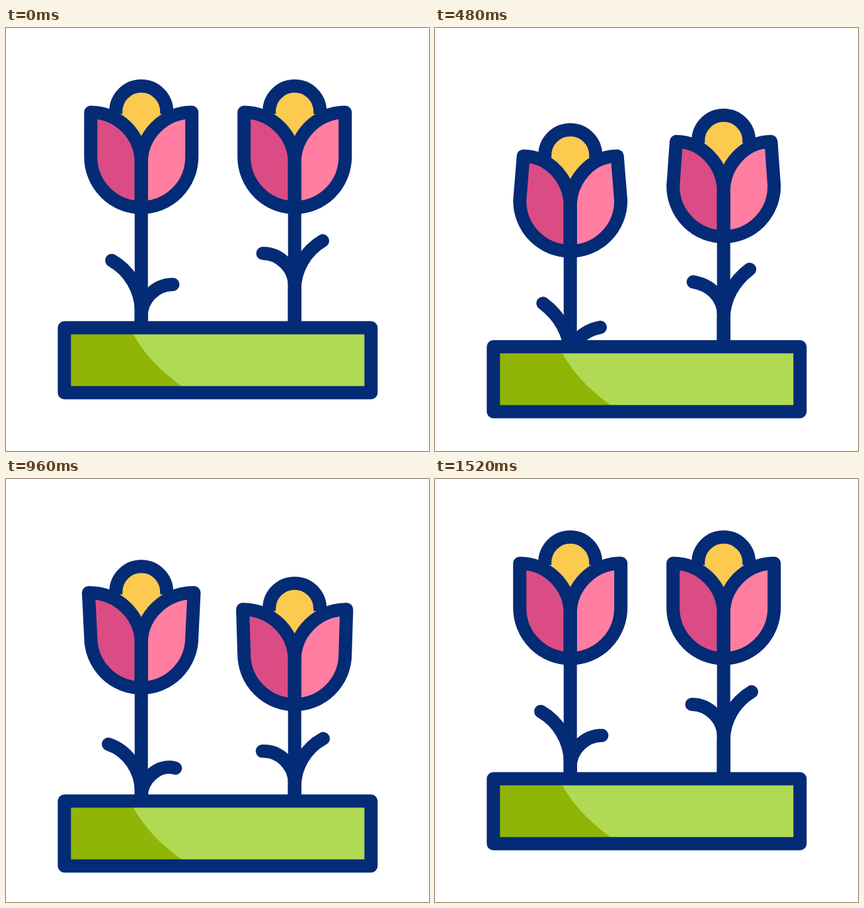
An HTML page for the animation above (1600 ms loop, 640x640 px).

```html
<!DOCTYPE html>
<html lang="en">
<head>
<meta charset="utf-8">
<title>Tulips</title>
<style>
  html, body { margin: 0; width: 100%; height: 100%; overflow: hidden; background: #fff; }
  svg { display: block; width: 100%; height: 100%; }
  .line { stroke: #042b75; stroke-width: 20; stroke-linecap: round; stroke-linejoin: round; }
</style>
</head>
<body>
<svg viewBox="0 0 640 640">
  <g id="flowers"></g>
  <g id="ground">
    <path d="M88.3 453.5H552.3V551.7H88.3Z" fill="#b0da54"/>
    <path d="M88.3 453.5H187.5C205 489 232 520 280 551.7H88.3Z" fill="#91b507"/>
    <path class="line" d="M88.3 453.5H552.3V551.7H88.3Z" fill="none"/>
  </g>
</svg>
<script>
const LOOP = 1600;
const NS = 'http://www.w3.org/2000/svg';
const ground = document.getElementById('ground');

function add(parent, tag, attrs) {
  const el = document.createElementNS(NS, tag);
  for (const name in attrs) el.setAttribute(name, attrs[name]);
  return parent.appendChild(el);
}

const smooth = s => s * s * (3 - 2 * s);

// Ease in and out, same as cubic-bezier(.5, 0, .5, 1)
function ease(s) {
  let lo = 0, hi = 1;
  for (let i = 0; i < 24; i++) {
    const u = (lo + hi) / 2;
    if (1.5 * u - 1.5 * u * u + u * u * u < s) lo = u; else hi = u;
  }
  return smooth((lo + hi) / 2);
}

// Value at time t along [time, value] keys
function track(keys, t, curve) {
  if (t <= keys[0][0]) return keys[0][1];
  for (let i = 1; i < keys.length; i++) {
    const [t0, v0] = keys[i - 1], [t1, v1] = keys[i];
    if (t < t1) return v0 + (v1 - v0) * curve((t - t0) / (t1 - t0));
  }
  return keys[keys.length - 1][1];
}

const groundKeys = [[10, 0], [760, 39], [1480, 0]];

// Leaves are given as offsets from the stem; long = slanted leaf, short = round leaf
const flowers = [
  {
    x: 204.7,
    sink: [[80, 0], [560, 39], [1208, 0]],
    tilt: [[80, 0], [320, 5.5], [620, 5.5], [900, -3.5], [1360, 0]],
    open: 1.5, side: -1,
    long: { x: 44.7, y: 351.7, root: 428 },
    short: { x: 47.8, y: 388, root: 436 }
  },
  {
    x: 436.7,
    sink: [[250, 0], [760, 38], [880, 38], [1340, 0]],
    tilt: [[280, 0], [600, 7], [700, 7], [1100, -5.6], [1520, 0]],
    open: 0.45, side: 1,
    long: { x: 42.3, y: 322, root: 396 },
    short: { x: 48.2, y: 341, root: 389.5 }
  }
];

function build(f) {
  const g = f.el = add(document.getElementById('flowers'), 'g', {});
  add(g, 'path', { d: 'M-38.5 138V126.3A38.5 38.5 0 0 1 38.5 126.3V138L0 180Z', fill: '#fdca50' });
  add(g, 'path', {
    d: 'M-38.5 130V126.3A38.5 38.5 0 0 1 38.5 126.3V130',
    class: 'line', fill: 'none', style: 'stroke-linecap:butt'
  });
  f.petals = ['#db4c85', '#ff7ea1'].map((fill, i) =>
    add(g, 'path', { fill, class: 'line', transform: `scale(${i ? -1 : 1} 1)` }));
  add(g, 'path', { d: 'M0 205V470', class: 'line' });
  f.leaves = [f.side, -f.side].map(dir =>
    add(g, 'path', { fill: 'none', class: 'line', transform: `scale(${dir} 1)` }));
}

function petal(k) {
  const tip = -76.5 + k;
  return `M${tip} 127.5L-76.5 195A76.5 76.5 0 0 0 0 271.5V204C0 161.8 ${-34.3 + k * 0.3} 127.5 ${tip} 127.5Z`;
}

function longLeaf(p, a, drop) {
  const x = p.x - a, y = p.y + drop;
  return `M${x} ${y}C${x * 0.4} ${y + 15 + a} 0 ${p.root - 31} 0 ${p.root}V460`;
}

function shortLeaf(p, a, drop) {
  const x = p.x - a * 0.75, y = p.y + drop;
  return `M${x} ${y}C${x - 26} ${y + a * 1.5} 0 ${p.root - 26} 0 ${p.root}V460`;
}

function draw(t) {
  const dy = track(groundKeys, t, ease);
  ground.setAttribute('transform', `translate(0 ${dy})`);
  for (const f of flowers) {
    const k = track(f.tilt, t, smooth);
    const a = k * (k > 0 ? 0.6 : f.open);
    const drop = a > 0 ? -0.4 * a : -a;
    f.el.setAttribute('transform', `translate(${f.x} ${dy + track(f.sink, t, ease)})`);
    for (const p of f.petals) p.setAttribute('d', petal(k));
    f.leaves[0].setAttribute('d', longLeaf(f.long, a, drop));
    f.leaves[1].setAttribute('d', shortLeaf(f.short, a, drop));
  }
}

flowers.forEach(build);
const start = performance.now();
function tick() {
  draw((performance.now() - start) % LOOP);
  requestAnimationFrame(tick);
}
tick();
</script>
</body>
</html>
```
